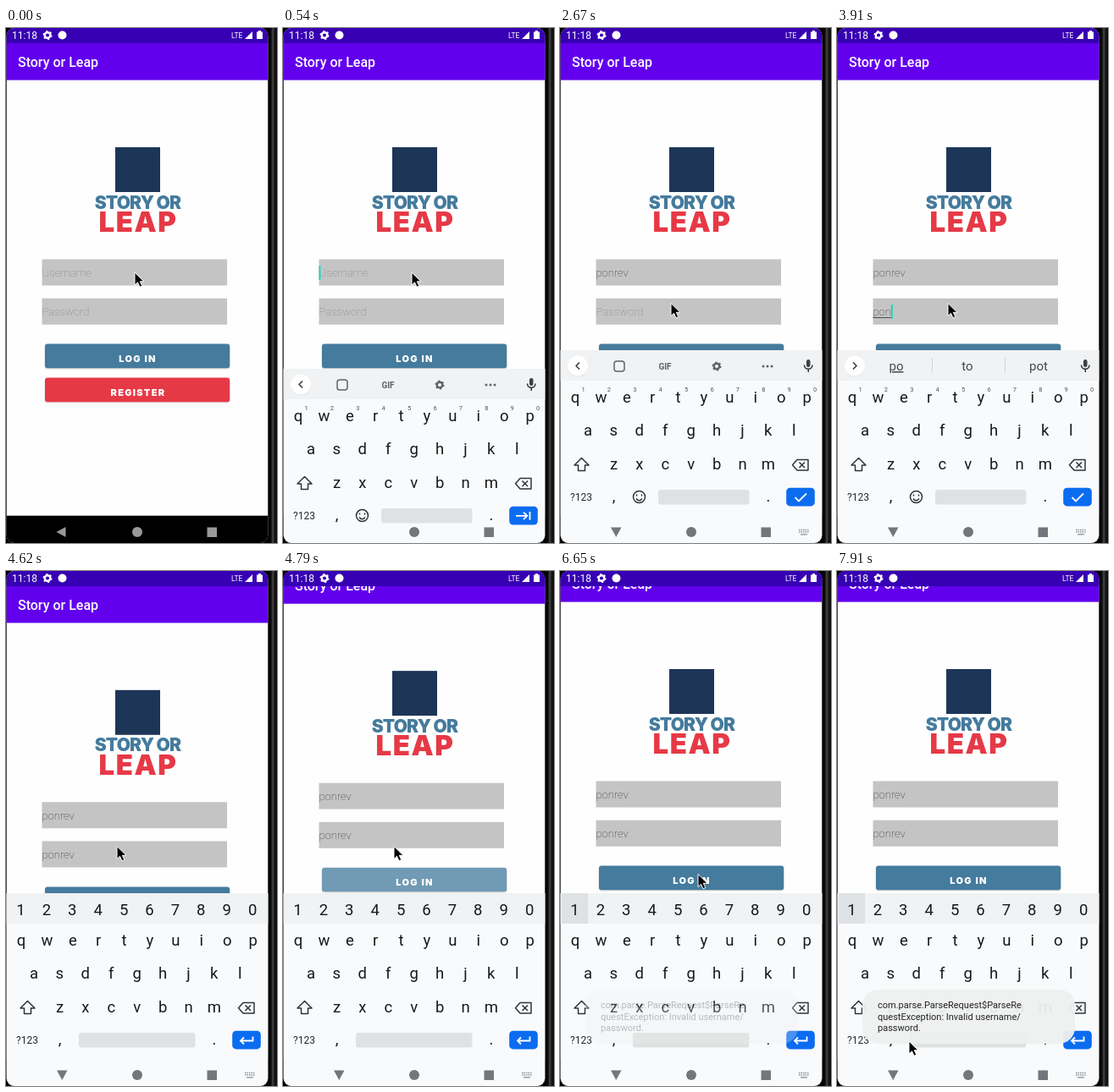
Animation, 320 px wide and 609 px high, one loop 8000 ms. Source, as an HTML page:

```html
<!DOCTYPE html>
<html lang="en">
<head>
<meta charset="utf-8">
<title>Login screen</title>
<style>
html, body { margin: 0; width: 100%; height: 100%; overflow: hidden; background: #000; }
svg { display: block; width: 100%; height: 100%; }
text { font-family: Roboto, "Open Sans", sans-serif; }
.brand text { font-family: Inter, "Liberation Sans", sans-serif; font-weight: 900; }
.thin { font-size: 13px; font-weight: 200; }
.key { font-size: 18.5px; fill: #17191b; text-anchor: middle; }
.hint { font-size: 7.5px; fill: #505458; text-anchor: middle; }
.word { font-size: 15px; fill: #45494d; text-anchor: middle; }
.line { fill: none; stroke: #303438; stroke-width: 1.5; stroke-linejoin: round; }
.enter { fill: none; stroke: #fff; stroke-width: 1.8; }
.shade { fill: #000; opacity: .14; }
</style>
</head>
<body>
<svg viewBox="0 0 320 609" preserveAspectRatio="none">
  <defs>
    <clipPath id="screen"><rect x=".7" width="308.600" height="609" rx="9"/></clipPath>
    <linearGradient id="edge">
      <stop offset="0" stop-color="#000"/><stop offset=".35" stop-color="#080808"/>
      <stop offset=".55" stop-color="#4a4846"/><stop offset=".72" stop-color="#1a1918"/>
      <stop offset="1" stop-color="#0a0a0a"/>
    </linearGradient>
    <g id="gear">
      <circle r="3.3" fill="none" stroke="currentColor" stroke-width="2.4"/>
      <circle r="4.8" fill="none" stroke="currentColor" stroke-width="1.5" stroke-dasharray="2.2 2.83"/>
    </g>
  </defs>
  <rect width="320" height="609"/>
  <rect x="309" width="11" height="609" fill="url(#edge)"/>
  <g clip-path="url(#screen)">
    <rect width="310" height="609" fill="#fefefe"/>
    <g id="page">
      <rect y="18" width="310" height="43.6" fill="#6200ee"/>
      <text x="14" y="46" font-size="16" font-weight="500" fill="#fff">Story or Leap</text>
      <rect x="129" y="141" width="53" height="53" fill="#1d3557"/>
      <g class="brand" text-anchor="middle">
        <text x="155.5" y="213.5" font-size="21" letter-spacing="-.8" fill="#457b9d">STORY OR</text>
        <text x="156" y="241" font-size="33" letter-spacing="1.5" fill="#e63946">LEAP</text>
      </g>
      <rect x="42.5" y="273.5" width="218.5" height="31" fill="#c4c4c4"/>
      <rect x="42.5" y="319.700" width="218.5" height="31" fill="#c4c4c4"/>
      <text id="user" class="thin" x="42.5" y="294"/>
      <text id="pass" class="thin" x="42.5" y="340"/>
      <rect id="under" height="1" fill="#4a4a4a"/>
      <rect id="caret" width="1.8" height="17" fill="#03dac5"/>
      <g class="brand" font-size="11" letter-spacing="1.3" text-anchor="middle" fill="#fff">
        <rect class="shade" x="45.5" y="374.5" width="219" height="29" rx="3.5"/>
        <rect id="login" x="46" y="373.6" width="218.2" height="28.6" rx="3"/>
        <text x="155.500" y="395">LOG IN</text>
        <rect class="shade" x="45.5" y="414.5" width="219" height="29" rx="3.5"/>
        <rect x="46" y="413.6" width="218.2" height="28.6" rx="3" fill="#e63946"/>
        <text x="156" y="435">REGISTER</text>
      </g>
    </g>
    <rect width="310" height="18" fill="#3700b3"/>
    <g fill="#fff" color="#fff">
      <text x="7" y="13" font-size="12">11:18</text>
      <use href="#gear" x="49" y="8.5"/>
      <circle cx="66.5" cy="8.5" r="5"/>
      <text x="266" y="12" font-size="8.5">LTE</text>
      <path d="M282 13L291 4V13ZM296 4.5h2V3h3v1.5h2V13h-7Z"/>
    </g>
    <rect y="576.7" width="310" height="33"/>
    <path d="M59.5 596L70.5 590V602Z" fill="#999"/>
    <g id="board">
      <rect y="381" width="310" height="228" fill="#f8fafc"/>
      <rect y="381" width="310" height="36" fill="#f0f2f3"/>
      <g id="strip">
        <circle cx="21" cy="400" r="12.2" fill="#dfe1e3"/>
        <circle cx="21" cy="399.5" r="12" fill="#fff"/>
        <path id="chevron" class="line"/>
        <rect x="291" y="392" width="4.5" height="9" rx="2.25" fill="#3c4043"/>
        <path class="line" d="M288.5 398.5a4.75 4.75 0 0 0 9.5 0M293.25 403.5V407"/>
        <g id="words">
          <path d="M112.5 390v18M198.5 390v18" stroke="#d5d8da"/>
          <text class="word" x="70" y="405" text-decoration="underline"/>
          <text class="word" x="154" y="405"/>
          <text class="word" x="238" y="405"/>
        </g>
        <g id="tools" color="#5f6368">
          <rect class="line" x="64" y="394" width="12" height="12" rx="3" style="stroke:#5f6368"/>
          <text x="124" y="404" font-size="10" font-weight="700" fill="#5f6368" text-anchor="middle">GIF</text>
          <use href="#gear" x="185" y="400"/>
          <path d="M240 400h12" stroke="#5f6368" stroke-width="3" stroke-linecap="round" stroke-dasharray="0 5"/>
        </g>
      </g>
      <g id="hints"></g>
      <g id="digits"><rect id="pressed" x="2" y="381" width="31" height="36" fill="#dfe2e5"/></g>
      <g id="keys"></g>
      <path class="line" d="M25.5 508.5L34 517H29.5V523.5H21.5V517H17Z"/>
      <path class="line" d="M280 510.5H293V523H280L274.5 516.75ZM282.5 513.5l6.5 6.5m0-6.5l-6.5 6.5"/>
      <text x="25" y="559" font-size="12" text-anchor="middle" fill="#25282b">?123</text>
      <g id="smile">
        <circle class="line" cx="93.5" cy="554.5" r="7"/>
        <path class="line" d="M90 556.5q3.5 4.5 7 0M90.5 551.5v2M96.5 551.5v2"/>
      </g>
      <rect id="space" y="546" height="17.5" rx="3" fill="#dfe1e2"/>
      <rect x="267.2" y="543.7" width="33.6" height="21.7" rx="4.5" fill="#0b6cf0"/>
      <path id="enter" class="enter"/>
      <path d="M60 590.5H72.5L66.25 602Z" fill="#73777b"/>
      <path d="M282 593.5h12M282 596h12" stroke="#8b8f93" stroke-width="1.5" stroke-dasharray="1.5 1"/>
      <path d="M284 598.8h8" stroke="#8b8f93" stroke-width="1.3"/>
    </g>
    <g id="nav"><circle cx="155" cy="596" r="6"/><rect x="237.5" y="590.5" width="11.5" height="11.5"/></g>
    <g id="toast">
      <rect x="30" y="495" width="251" height="64" rx="19" fill="#eff0f0" opacity=".95"/>
      <g font-size="11" fill="#242424">
        <text x="48" y="517">com.parse.ParseRequest$ParseRe</text>
        <text x="48" y="530.5">questException: Invalid username/</text>
        <text x="48" y="544">password.</text>
      </g>
    </g>
  </g>
  <path id="pointer" d="M0 0V15L3.5 11.8L6 17.3L8.8 16L6.3 10.8H11Z" stroke="#fff"/>
</svg>
<script>
const LOOP = 8000;
const $ = id => document.getElementById(id);
const set = (el, attrs) => { for (const k in attrs) el.setAttribute(k, attrs[k]); };
const show = (id, on) => set($(id), { display: on ? "inline" : "none" });
const span = (t, a, b) => Math.max(0, Math.min(1, (t - a) / (b - a)));
const easeOut = (p, power) => 1 - Math.pow(1 - p, power);

function label(parent, cls, x, y, str) {
  const el = document.createElementNS("http://www.w3.org/2000/svg", "text");
  set(el, { class: cls, x, y });
  el.textContent = str;
  $(parent).append(el);
}
function row(parent, cls, x, y, chars) {
  [...chars].forEach((c, i) => label(parent, cls, x + i * 30.4, y, c));
}
row("digits", "key", 17.5, 406.5, "1234567890");
row("hints", "hint", 27.5, 430, "1234567890");
row("keys", "key", 18, 443, "qwertyuiop");
row("keys", "key", 33, 482, "asdfghjkl");
row("keys", "key", 63.5, 522, "zxcvbnm");
label("keys", "key", 63.5, 560, ",");
label("keys", "key", 246, 560, ".");

const NAME = "ponrev";
// [time, letters typed]
const userKeys = [[0, 0], [800, 1], [980, 2], [1150, 3], [1330, 5], [1420, 6]];
const passKeys = [[0, 0], [3470, 1], [3640, 2], [3910, 3], [4000, 4], [4090, 5], [4350, 6]];
const wordKeys = [
  [0, ""], [980, "p,o,l"], [1150, "po,to,pot"], [1330, "pon,pond,pony"],
  [1420, "ponre,Ponrev,Ponre"], [1600, "ponrev,Ponrev,ponder"], [2140, ""],
  [3560, "p,o,l"], [3730, "po,to,pot"], [4000, "pon,pond,pony"], [4090, "ponre,Ponrev,Ponre"]
];
// [time, x, y]
const path = [
  [0, 152, 289], [1780, 152, 289], [2100, 131, 325.5], [5140, 131, 325.5], [5400, 150, 380],
  [5580, 150, 380], [5760, 150, 362], [5850, 150, 362], [6380, 162, 359], [6470, 163, 358.5],
  [7640, 163, 358.5], [7910, 85, 556]
];
// [time, share of white in the button]
const tint = [[0, 0], [4620, 0], [4790, .235], [5580, .235], [5850, .15], [6380, 0]];

const held = (keys, t) => keys.filter(k => k[0] <= t).pop()[1];
function blend(keys, t, n) {
  const i = keys.findIndex(k => k[0] > t);
  if (i < 0) return keys[keys.length - 1][n];
  const a = keys[i - 1], b = keys[i];
  return a[n] + (b[n] - a[n]) * span(t, a[0], b[0]);
}

function field(el, count, hint) {
  const str = count ? NAME.slice(0, count) : hint;
  if (el.textContent !== str) el.textContent = str;
  set(el, { fill: count ? "#333" : "#858585" });
  return count ? el.getComputedTextLength() : 0;
}

const enterIcons = [
  "M275 554.8H288M284 550.5l4.3 4.3l-4.3 4.3M291.5 550v9.6",
  "M277.5 555l4.5 4.5l9-9",
  "M291.5 550.5V555.5H277M281 551.5l-4 4l4 4"
];

function drawPage(t, onPass, numeric) {
  const scroll = 25 * easeOut(span(t, 4620, 4880), 2.3);
  set($("page"), { transform: `translate(0 ${-scroll})` });
  const userW = field($("user"), held(userKeys, t), "Username");
  const passW = field($("pass"), held(passKeys, t), "Password");
  const width = onPass ? passW : userW, y = onPass ? 327 : 281;
  set($("caret"), { x: 42.5 + width, y });
  set($("under"), { x: 42.5, y: y + 15, width });
  show("caret", t >= 90 && !numeric && !(t >= 2670 && t < 3200));
  show("under", !numeric);

  const mix = blend(tint, t, 1);
  const rgb = [69, 123, 157].map(c => Math.round(c + (255 - c) * mix));
  set($("login"), { fill: `rgb(${rgb})` });
}

function drawBoard(t, onPass, numeric) {
  const open = easeOut(span(t, 330, 720), 3);
  set($("board"), { transform: `translate(0 ${228 * (1 - open)})` });
  show("board", open > 0);
  set($("nav"), { fill: open > .15 ? "#73777b" : "#999" });

  const words = held(wordKeys, t).split(",");
  const hasWords = words.length > 1;
  $("words").querySelectorAll("text").forEach((el, i) => { el.textContent = words[i] || ""; });
  set($("chevron"), { d: hasWords ? "M19 395.5l4 4l-4 4" : "M23 395.5l-4 4l4 4" });
  show("words", hasWords);
  show("tools", !hasWords);
  for (const id of ["strip", "hints", "smile"]) show(id, !numeric);
  show("digits", numeric);
  show("pressed", t >= 4880);

  const left = numeric ? 86 : 116;
  set($("space"), { x: left, width: 223.5 - left });
  set($("enter"), { d: enterIcons[numeric ? 2 : onPass ? 1 : 0] });
}

function draw(t) {
  const onPass = t >= 2140, numeric = t >= 4620;
  drawPage(t, onPass, numeric);
  drawBoard(t, onPass, numeric);
  set($("toast"), { opacity: t < 6650 ? 0 : .3 + .7 * span(t, 6650, 7190) });
  set($("pointer"), { transform: `translate(${blend(path, t, 1)} ${blend(path, t, 2)})` });
}

const start = performance.now();
function tick() {
  draw((performance.now() - start) % LOOP);
  requestAnimationFrame(tick);
}
tick();
</script>
</body>
</html>
```
